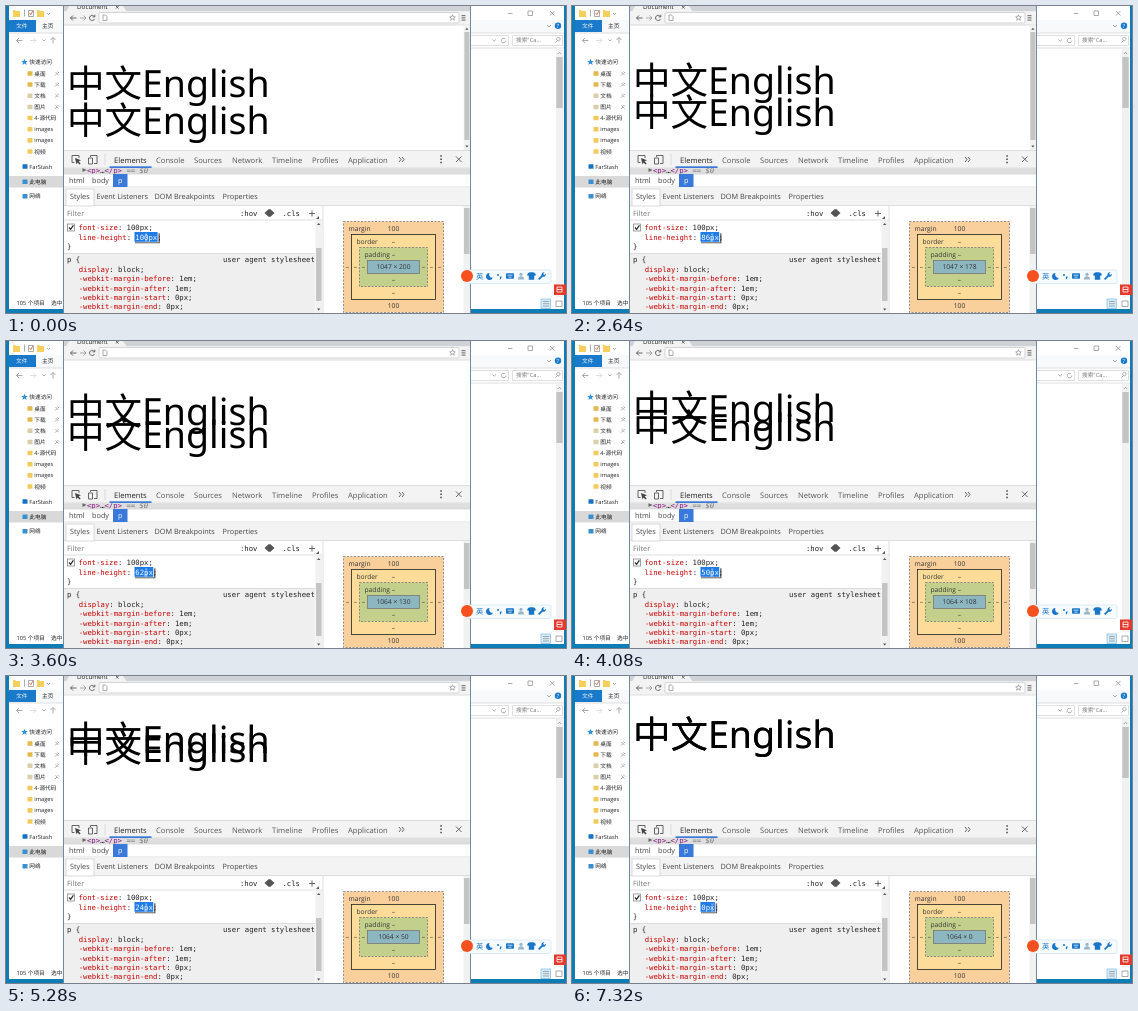
An HTML page for the animation above (8160 ms loop, 560 by 307 pixels).

```html
<!DOCTYPE html>
<html lang="zh-CN">
<head>
<meta charset="utf-8">
<title>line-height</title>
<style>
html, body { margin: 0; width: 100%; height: 100%; overflow: hidden; background: #fff; }
svg { display: block; }
text { font: 5.7px "Open Sans", "Noto Sans CJK SC", "Noto Sans CJK", sans-serif; fill: #222; text-rendering: geometricPrecision; white-space: pre; }
.big { font: 37.5px "Noto Sans", "Noto Sans CJK SC", "Noto Sans CJK", sans-serif; fill: #000; }
.url { font-size: 6.3px; }
.tab { font-size: 7.6px; fill: #555; }
.on { fill: #222; }
.sub { font-size: 7.3px; fill: #444; }
.code, .code text { font: 7.28px "DejaVu Sans Mono", monospace; fill: #222; }
.prop { fill: #c80000; }
.white { fill: #fff !important; }
.grey { fill: #777; }
.box text { font-size: 6.7px; text-anchor: middle; fill: #333; }
.line { fill: none; stroke: #555; stroke-width: .9; }
.thin { fill: none; stroke: #888; stroke-width: .7; }
.hair { fill: none; stroke: #d2d2d2; stroke-width: .7; }
.track { fill: #f1f1f1; }
.thumb { fill: #c4c4c4; }
</style>
</head>
<body>
<svg width="560" height="307" viewBox="0 0 560 307">
  <rect width="560" height="307" fill="#0f7db5"/>

  <!-- file manager behind -->
  <rect x="3" width="555" height="303" fill="#fff"/>
  <rect x="3" y="14" width="555" height="13" fill="#f8f9fa"/>
  <path class="hair" d="M3 27H558M464 42H558"/>
  <path d="M7 4h2l1 1h4v6H7zM31 4h2l1 1h4v6h-7z" fill="#f6cf5d"/>
  <path class="thin" d="M18.500 3.500v7M22.500 4.500h5v6h-5zM41 7l1.500 1.500L44 7"/>
  <path d="M23.500 7l1.300 1.600L27 5" fill="none" stroke="#d9603b" stroke-width=".9"/>
  <rect x="3" y="14" width="27" height="12" fill="#1979ca"/>
  <text class="white" x="10" y="21.800">文件</text>
  <text x="36" y="21.800">主页</text>
  <path class="thin" d="M16.500 34.500h-6l2.500-2.500M10.500 34.500l2.500 2.500M47 37.500v-6l-2.500 2.500M47 31.500l2.500 2.500M36.500 33.500l1.500 1.500 1.500-1.500"/>
  <path class="hair" d="M24 34.500h6l-2.500-2.500M30 34.500l-2.500 2.500"/>
  <rect x="3" y="170" width="55" height="11.500" fill="#d9d9d9"/>
  <g id="nav"></g>
  <text x="10.500" y="299.200">105 个项目</text>
  <text x="45" y="299.200">选中</text>
  <path class="thin" d="M541 19l2 2 2-2M502 7.500h4.500M522 5h4.500v4.500H522zM544 5l4.500 4.500m0-4.500L544 9.500"/>
  <circle cx="552" cy="19.800" r="3.200" fill="#1979ca"/>
  <text class="white" x="550.600" y="21.900">?</text>
  <path class="hair" d="M464 29.500H502.500V39.500H464M506.500 29.500H556.500V39.500H506.500z"/>
  <path class="thin" d="M499 32.800a2.300 2.300 0 1 0 .8 1.700M486.500 33.500l1.700 1.700 1.700-1.700M549.500 36.500l2-2a1.700 1.700 0 1 1 .2 .1"/>
  <text class="grey" x="510" y="36.400">搜索"Ca...</text>
  <rect class="track" x="550" y="42.500" width="7" height="249"/>
  <rect class="thumb" x="550.300" y="51" width="6.400" height="51"/>
  <path class="thin" d="M551.800 48l1.700-1.700 1.700 1.700"/>
  <rect x="535" y="293" width="9.500" height="9.500" fill="#d6ecfa" stroke="#7dbde8" stroke-width=".7"/>
  <path class="thin" d="M537 295.500h6M537 297.700h6M537 300h6M550 295h6v5.500h-6z"/>

  <!-- browser -->
  <rect x="57" width="408" height="307" fill="#6e8ba3"/>
  <rect x="58" width="406" height="307" fill="#fff"/>
  <rect x="58" width="406" height="5.500" fill="#cfd3d8"/>
  <path d="M60 6l3-6h54l4 6z" fill="#f3f3f3"/>
  <text class="url" x="71" y="3">Document</text>
  <path class="line" d="M110 0l2.500 2.500m0-2.500l-2.500 2.500"/>
  <rect x="58" y="5.500" width="406" height="13.500" fill="#f3f3f3"/>
  <path class="line" d="M70.500 12h-6l2.500-2.500M64.500 12l2.500 2.500M88.300 10.500a2.600 2.600 0 1 0 .2 2.500M88.800 8.700v2.200h-2.200"/>
  <path class="thin" d="M74 12h6l-2.500-2.500M80 12l-2.500 2.500"/>
  <rect x="93" y="6.500" width="360" height="10.500" rx="1" fill="#fff" stroke="#c4c4c4" stroke-width=".7"/>
  <path class="thin" d="M97 9h2.500l1.500 1.500v4h-4zM446.500 8.800l.8 1.900 2 .2-1.500 1.300.5 2-1.800-1.100-1.800 1.100.5-2-1.500-1.300 2-.2z"/>
  <path class="line" d="M455.500 9.700h4M455.500 11.900h4M455.500 14.100h4"/>
  <path class="hair" d="M58 19H464"/>

  <text class="big" id="row0" x="61"></text>
  <text class="big" id="row1" x="61"></text>
  <g id="bar">
    <rect class="track" x="457.700" y="19.500" width="6.300" height="125"/>
    <rect class="thumb" x="458.400" y="26" width="5" height="108"/>
    <path d="M459.300 23.800l1.600-2 1.600 2zM459.300 139.500l1.600 2 1.600-2z" fill="#555"/>
  </g>

  <!-- developer tools -->
  <rect x="58" y="144.500" width="406" height="17.500" fill="#f3f3f3"/>
  <path class="hair" d="M58 144.500H464M58 162H464M99 148V159"/>
  <path class="line" d="M73 152v-2.500h-7v7h2.500M84.500 151v-1.500h6.500v8h-3M82.500 152h4v6h-4z"/>
  <path d="M69 152l6 2.300-2.400 1 2 2.200-1 1-2.100-2.100-1 2z" fill="#444"/>
  <g id="tabs"></g>
  <rect x="103.500" y="160.300" width="42" height="1.800" fill="#3879d9"/>
  <path d="M434.300 149.300h1.500v1.500h-1.500zM434.300 152.500h1.500v1.500h-1.500zM434.300 155.700h1.500v1.500h-1.500z" fill="#444"/>
  <path class="line" d="M450 150.500l5.500 5.500m0-5.500l-5.500 5.500"/>
  <rect x="58" y="162.200" width="406" height="5.800" fill="#dedede"/>
  <svg x="58" y="162.200" width="406" height="5.800" viewBox="58 162.200 406 5.800">
    <path d="M76.500 162l4 2-4 2z" fill="#666"/>
    <text class="code" x="81" y="166.800"><tspan fill="#881280">&lt;p&gt;</tspan>…<tspan fill="#881280">&lt;/p&gt;</tspan> <tspan class="grey" font-style="italic">== $0</tspan></text>
  </svg>
  <path class="hair" d="M58 168H464M58 181H464"/>
  <rect x="107" y="168" width="14.500" height="13" fill="#3879d9"/>
  <text class="sub" x="63" y="176.600">html</text>
  <text class="sub" x="86" y="176.600">body</text>
  <text class="sub white" x="112" y="176.600" font-weight="600">p</text>
  <rect x="58" y="181.300" width="406" height="18" fill="#f3f3f3"/>
  <rect x="60" y="183" width="28" height="17" fill="#fff" stroke="#ccc" stroke-width=".7"/>
  <path class="hair" d="M58 199.500H60M88 199.500H464"/>
  <g id="subtabs"></g>

  <text class="sub grey" x="61" y="210">Filter</text>
  <path class="hair" d="M58 214H317M317 200V307"/>
  <path d="M258.500 207l4-3.800h2l4 3.800-4 3.800h-2z" fill="#555"/>
  <path class="line" d="M303 207.500h6M306 204.500v6"/>
  <path d="M313 213v-3l-3 3z" fill="#555"/>
  <rect x="58" y="247.500" width="251" height="60" fill="#efefef"/>
  <path class="hair" d="M58 247.500H309"/>
  <rect class="track" x="309.500" y="214.500" width="6.500" height="93"/>
  <rect class="thumb" x="310" y="242" width="5.500" height="53"/>
  <path d="M311 219l1.700-2 1.700 2zM311 302.500l1.700 2 1.700-2z" fill="#555"/>
  <rect class="track" x="457.500" y="200" width="6.500" height="107"/>
  <rect class="thumb" x="458" y="202" width="5.500" height="46"/>
  <rect x="61.500" y="218" width="7" height="7" fill="#fff" stroke="#888" stroke-width=".8"/>
  <path d="M63 221.500l1.600 1.800 2.800-4" fill="none" stroke="#222" stroke-width="1.200"/>
  <g class="code">
    <text x="234" y="209.500">:hov</text>
    <text x="276.500" y="209.500">.cls</text>
    <text x="61" y="242.500">}</text>
    <text x="61" y="256">p {</text>
    <text class="grey" x="217" y="256">user agent stylesheet</text>
    <g id="rules"></g>
    <text x="72.500" y="233.500"><tspan class="prop">line-height</tspan>:</text>
    <rect id="shade" x="129" y="227.300" height="10" fill="#6f6f6f"/>
    <rect id="edit" x="127.500" y="225.800" height="10.400" fill="#fff"/>
    <rect id="pick" x="128.500" y="226" height="9.800" fill="#1f7be6"/>
    <text class="white" id="value" x="129.300" y="233.500"></text>
    <text id="semi" y="233.500">;</text>
  </g>
  <path d="M139 228h2.400M140.200 228v7M139 235h2.400" fill="none" stroke="#fff" stroke-width=".6" opacity=".7"/>

  <g class="box" id="model"></g>

  <!-- input method bar -->
  <rect x="460" y="264" width="85" height="13.500" rx="2" fill="#f6fbff" stroke="#cfe2f1" stroke-width=".7"/>
  <circle cx="461" cy="270" r="6" fill="#f4511e"/>
  <text x="470" y="272.800" style="font-size:7.300px;fill:#1976c8">英</text>
  <g fill="#1976c8">
    <path d="M483.500 267a3.500 3.500 0 1 0 3.300 4.800a3.300 3.300 0 0 1-3.300-4.800z"/>
    <circle cx="492" cy="269" r="1"/><path d="M494 270.500h1.800l-1 2.800h-1z"/>
    <rect x="500" y="267.300" width="8" height="5.400" rx=".8"/>
    <g fill="#9ab4c8"><circle cx="515" cy="268.300" r="1.600"/><path d="M512 273.500a3 3.300 0 0 1 6 0z"/></g>
    <path d="M522 267l2-.8h3l2 .8 1 2.200-1.800.5v4h-5.400v-4l-1.800-.5z"/>
    <path d="M532 272.800l3.500-3.500a2.500 2.500 0 0 1 3-3l-1.400 1.600 1.200 1.200 1.500-1.300a2.500 2.500 0 0 1-3.200 2.900l-3.400 3.400z"/>
  </g>
  <path d="M501.500 269.200h5M502.500 271.200h3" stroke="#fff" stroke-width=".7"/>
  <rect x="548" y="278.500" width="12" height="10.500" fill="#e23b2e"/>
  <path d="M551 281h5v5h-5zM551 283.500h5" fill="none" stroke="#fff" stroke-width=".8"/>
</svg>
<script>
const $ = id => document.getElementById(id);
const add = (id, html) => $(id).insertAdjacentHTML('beforeend', html);
const label = (x, y, s, cls = '') => `<text class="${cls}" x="${x}" y="${y}">${s}</text>`;

// navigation pane: name, centre y, indent, icon colour
[['快速访问', 55.7, 0, '#2f8fdd'], ['桌面', 67.5, 5, '#e3b94e'], ['下载', 78.5, 5, '#e3b94e'],
 ['文档', 89.7, 5, '#d9cfa8'], ['图片', 101, 5, '#d9cfa8'], ['4-源代码', 112, 5, '#f3cb5c'],
 ['images', 123.3, 5, '#f3cb5c'], ['images', 134.4, 5, '#f3cb5c'], ['视频', 145.5, 5, '#f3cb5c'],
 ['FarStash', 160.5, 0, '#1673c4'], ['此电脑', 175.7, 0, '#3a8fce'], ['网络', 190.2, 0, '#3a8fce']
].forEach(([name, y, dx, color], i) => {
  const x = 15.5 + dx;
  const icon = i ? `<rect x="${x + 1}" y="${y - 2.3}" width="5" height="4.6" rx=".6" fill="${color}"/>`
    : `<path d="M18.5 52.7l1 2.2 2.3.2-1.8 1.5.6 2.3-2.1-1.3-2.1 1.3.6-2.3-1.8-1.5 2.3-.2z" fill="${color}"/>`;
  add('nav', icon + label(23.3 + dx, y + 2, name));
  if (i && i < 5) add('nav', `<path class="thin" d="M49 ${y + 2}l2-2m-1.5-1.5l3 3m-1-3.5l1.5 1.5"/>`);
});

[['Elements', 108], ['Console', 150], ['Sources', 188], ['Network', 226], ['Timeline', 266],
 ['Profiles', 306], ['Application', 342]]
  .forEach(([s, x], i) => add('tabs', label(x, 156.5, s, i ? 'tab' : 'tab on')));
add('tabs', '<path class="line" d="M393 151l2 2.5-2 2.5M396 151l2 2.5-2 2.5"/>');
[['Styles', 64], ['Event Listeners', 90.5], ['DOM Breakpoints', 148.5], ['Properties', 216.5]]
  .forEach(([s, x]) => add('subtabs', label(x, 193, s, 'sub')));
[['font-size', '100px', 72.5, 224], ['display', 'block', 72.7, 266], ['-webkit-margin-before', '1em', 72.7, 275.3],
 ['-webkit-margin-after', '1em', 72.7, 284.6], ['-webkit-margin-start', '0px', 72.7, 293.8], ['-webkit-margin-end', '0px', 72.7, 303]]
  .forEach(([k, v, x, y]) => add('rules', label(x, y, `<tspan class="prop">${k}</tspan>: ${v};`)));

// box model, outermost ring first
const mid = 387.5, dashed = '#777" stroke-dasharray="2 1.5';
[['margin', '#f9cf9c', dashed, '100'], ['border', '#fddc9a', '#222', '–'],
 ['padding', '#c3d08b', dashed, '–'], ['', '#8cb6c0', '#777', '']
].forEach(([name, fill, stroke, edge], i) => {
  const x = 337.5 + 8 * i, y = 215.5 + 13 * i, w = 100 - 16 * i, h = 91 - 26 * i;
  add('model', `<rect x="${x}" y="${y}" width="${w}" height="${h}" fill="${fill}" stroke="${stroke}" stroke-width=".8"/>`);
  if (!name) return;
  add('model', `<text x="${x + 5}" y="${y + 9}" style="text-anchor:start">${name}</text>` +
    label(mid, y + 9, edge) + label(mid, y + h - 4.3, edge) +
    label(x + 4, 262.8, '–') + label(x + w - 4, 262.8, '–'));
});
add('model', `<text id="size" x="${mid}" y="263"></text>`);

$('row0').textContent = $('row1').textContent = '中文English';

const LOOP = 8160, SCALE = 0.375, TOP = 57, CHAR = 4.38;
// [start ms, line-height px]
const steps = [[0, 100], [1080, 99], [1800, 98], [2160, 95], [2400, 91], [2640, 86], [2880, 80], [3120, 73],
  [3360, 68], [3600, 62], [3840, 57], [4080, 50], [4320, 43], [4560, 36], [4800, 31], [5040, 27], [5280, 24],
  [5520, 21], [5760, 17], [5880, 13], [6120, 12], [6600, 9], [6840, 5], [7080, 1], [7320, 0]];
let shown = -1;

function draw(i) {
  const px = steps[i][1], prev = i ? steps[i - 1][1] : px;
  const laid = px + Math.floor((prev - px) * 0.6); // box model trails the typed value
  const scrolls = laid > 70, value = px + 'px', w = value.length * CHAR;
  [0, 1].forEach(k => $('row' + k).setAttribute('y', TOP + 15 + px * SCALE * (k + 0.5)));
  $('bar').style.display = scrolls ? '' : 'none';
  $('value').textContent = value;
  $('pick').setAttribute('width', w + 1.2);
  $('edit').setAttribute('width', w + 3);
  $('shade').setAttribute('width', w + 3);
  $('semi').setAttribute('x', 129.3 + w);
  $('size').textContent = `${scrolls ? 1047 : 1064} × ${laid * 2}`;
}

function tick() {
  const t = performance.now() % LOOP;
  const i = steps.filter(s => s[0] <= t).length - 1;
  if (i !== shown) draw(shown = i);
  requestAnimationFrame(tick);
}
tick();
</script>
</body>
</html>
```
